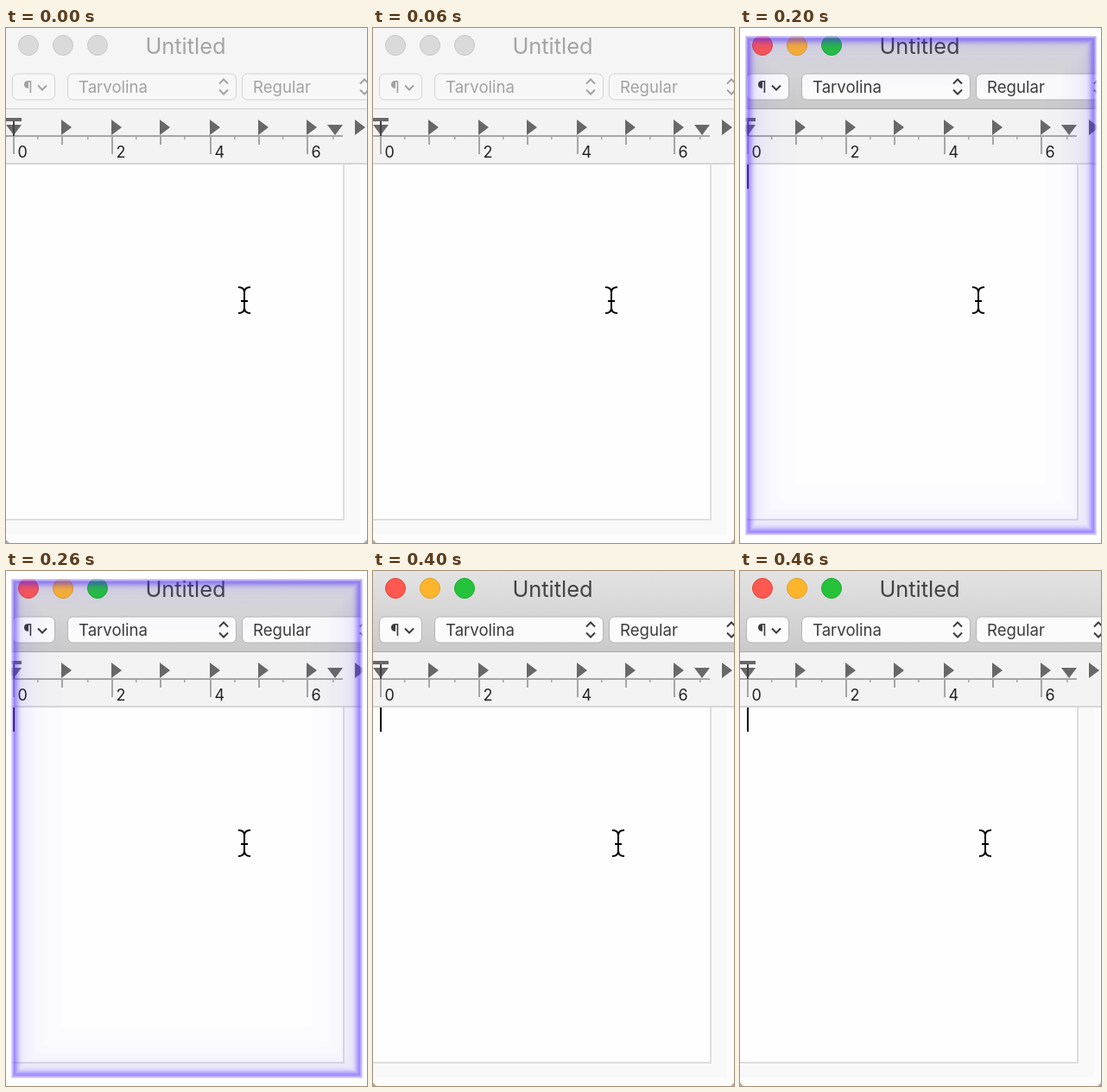
Write an HTML page with a canvas that moves like this. It is 418 by 596 pixels and loops after 0.5 s.

```html
<!DOCTYPE html>
<html lang="en">
<head>
<meta charset="utf-8">
<title>Editor window</title>
<style>
html, body { margin: 0; width: 100%; height: 100%; overflow: hidden; background: #fff; }
canvas { display: block; }
</style>
</head>
<body>
<canvas id="stage" width="418" height="596"></canvas>
<script>
const ctx = document.getElementById('stage').getContext('2d');
const W = 418, H = 596, STEP = 100, LOOP = 500;

const ACTIVE = {
  bar: ['#e3e3e3', '#cacaca'], edge: '#a9a9a9', title: '#434343', text: '#3c3c3c',
  box: '#fbfbfb', boxEdge: '#b4b4b4',
  lights: [['#ff5850', '#e2463f'], ['#ffb52b', '#e09f25'], ['#25c33b', '#1dac2d']]
};
const INACTIVE = {
  bar: ['#f5f5f5', '#f5f5f5'], edge: '#d0d0d0', title: '#a4a4a4', text: '#a2a2a2',
  box: '#f7f7f7', boxEdge: '#d3d3d3',
  lights: Array(3).fill(['#dadada', '#c7c7c7'])
};

// near/far: strengths of the tight and the wide part of the glow
const POSES = [
  { look: INACTIVE, cursor: 276 },
  { look: ACTIVE, cursor: 276 },
  { look: ACTIVE, cursor: 276, glow: { x: 6, y: 9, r: 413, b: 587, near: 0.36, far: 0.17, reach: 17 } },
  { look: ACTIVE, cursor: 276, glow: { x: 5, y: 8, r: 414, b: 589, near: 0.15, far: 0.08, reach: 13 } },
  { look: ACTIVE, cursor: 284 }
];

function rect(x, y, w, h, color) {
  ctx.fillStyle = color;
  ctx.fillRect(x, y, w, h);
}

function polygon(color, ...points) {
  ctx.fillStyle = color;
  ctx.beginPath();
  points.forEach(([x, y]) => ctx.lineTo(x, y));
  ctx.fill();
}

function line(color, width, ...points) {
  ctx.strokeStyle = color;
  ctx.lineWidth = width;
  ctx.beginPath();
  points.forEach(([x, y]) => ctx.lineTo(x, y));
  ctx.stroke();
}

function text(str, x, y, size, color, align = 'left') {
  ctx.font = `${size}px Inter, sans-serif`;
  ctx.textAlign = align;
  ctx.fillStyle = color;
  ctx.fillText(str, x, y);
}

function chevron(x, y, dir, color) {
  line(color, 2, [x - 5, y - 2.5 * dir], [x, y + 2.5 * dir], [x + 5, y - 2.5 * dir]);
}

function control(x, w, look) {
  ctx.beginPath();
  ctx.roundRect(x, 53, w, 30, 6);
  ctx.fillStyle = look.box;
  ctx.fill();
  ctx.strokeStyle = look.boxEdge;
  ctx.lineWidth = 1;
  ctx.stroke();
}

function stepper(x, color) {
  chevron(x, 62, -1, color);
  chevron(x, 74, 1, color);
}

function drawToolbar(look) {
  const shade = ctx.createLinearGradient(0, 0, 0, 93);
  look.bar.forEach((color, i) => shade.addColorStop(i, color));
  rect(0, 0, W, 93, shade);
  rect(0, 93, W, 1, look.edge);

  look.lights.forEach(([fill, edge], i) => {
    ctx.beginPath();
    ctx.arc(26 + 40 * i, 20, 11.5, 0, 2 * Math.PI);
    ctx.fillStyle = fill;
    ctx.fill();
    ctx.strokeStyle = edge;
    ctx.lineWidth = 1;
    ctx.stroke();
  });
  text('Untitled', 208, 30, 25.4, look.title, 'center');

  control(7.5, 49, look);
  text('¶', 20, 75, 18, look.text);
  chevron(42, 69, 1, look.text);
  control(71.5, 195, look);
  text('Tarvolina', 84, 75, 18.6, look.text);
  stepper(252, look.text);
  control(273.5, 160, look);
  text('Regular', 286, 75, 18.6, look.text);
  stepper(415, look.text);
}

function drawRuler() {
  const dark = '#686868', tick = '#a6a6a6';
  rect(0, 94, W, 62, '#f3f3f3');
  rect(0, 156, W, 2, '#d6d6d6');
  rect(0, 124, 390, 2, tick);
  for (let half = 0; half <= 13; half++) {
    const x = 8 + 2 * Math.round(half * 14.2);
    const length = half % 4 === 0 ? 20 : half % 2 === 0 ? 9 : 3;
    rect(x, 126, half % 2 ? 1.5 : 2, length, tick);
    if (half % 4 === 0) text(half / 2, x + 5.5, 150, 18, '#222');
    if (half && half % 2 === 0) polygon(dark, [x, 106], [x + 12, 115], [x, 124]);
  }
  polygon(dark, [404, 106], [416, 115], [404, 124]);
  for (const x of [9, 381]) polygon(dark, [x - 9, 112], [x + 9, 112], [x, 124]);
  rect(0, 104, 18, 4, dark);
  rect(8, 108, 2, 17, '#404040');
}

function drawPage() {
  rect(0, 158, W, H - 158, '#f9f9f9');
  rect(410, 158, 8, H - 158, '#fcfcfc');
  rect(0, 586, W, 10, '#fcfcfc');
  rect(0, 158, 392, 412, '#dedede');
  rect(0, 158, 390, 410, '#fefefe');
}

function drawCursor(x) {
  ctx.strokeStyle = '#000';
  ctx.lineWidth = 2;
  ctx.beginPath();
  for (const side of [-1, 1]) {
    ctx.moveTo(x + 7 * side, 300);
    ctx.quadraticCurveTo(x, 300, x, 306);
    ctx.lineTo(x, 324);
    ctx.quadraticCurveTo(x, 330, x + 7 * side, 330);
  }
  ctx.moveTo(x - 4, 316);
  ctx.lineTo(x + 4, 316);
  ctx.stroke();
}

function drawCorners() {
  polygon('#b0b0b0', [0, 592], [4, 596], [0, 596]);
  polygon('#b0b0b0', [W, 592], [W - 4, 596], [W, 596]);
}

function drawGlow({ x, y, r, b, near, far, reach }) {
  ctx.lineWidth = 1;
  for (let d = 0; d < 60; d++) {
    const alpha = near * Math.exp(-(((d - 3) / 5) ** 2)) + far * Math.exp(-d / reach);
    ctx.strokeStyle = `rgba(70,35,255,${alpha})`;
    ctx.strokeRect(x + d + 0.5, y + d + 0.5, r - x - 2 * d - 1, b - y - 2 * d - 1);
  }
  for (let d = 0; d < 3; d++) {
    ctx.strokeStyle = `rgba(250,238,255,${0.65 - 0.22 * d})`;
    ctx.strokeRect(x + d + 0.5, y + d + 0.5, r - x - 2 * d - 1, b - y - 2 * d - 1);
  }
  rect(0, 0, W, y, '#fff');
  rect(0, b, W, H - b, '#fff');
  rect(0, 0, x, H, '#fff');
  rect(r, 0, W - r, H, '#fff');
}

function draw(time) {
  const { look, cursor, glow } = POSES[Math.floor((time % LOOP) / STEP)];
  drawPage();
  drawToolbar(look);
  drawRuler();
  if (look === ACTIVE) rect(8, 158, 2, 28, '#000');
  drawCursor(cursor);
  if (glow) drawGlow(glow);
  else drawCorners();
}

const start = performance.now();
function tick() {
  draw(performance.now() - start);
  requestAnimationFrame(tick);
}
tick();
</script>
</body>
</html>
```
